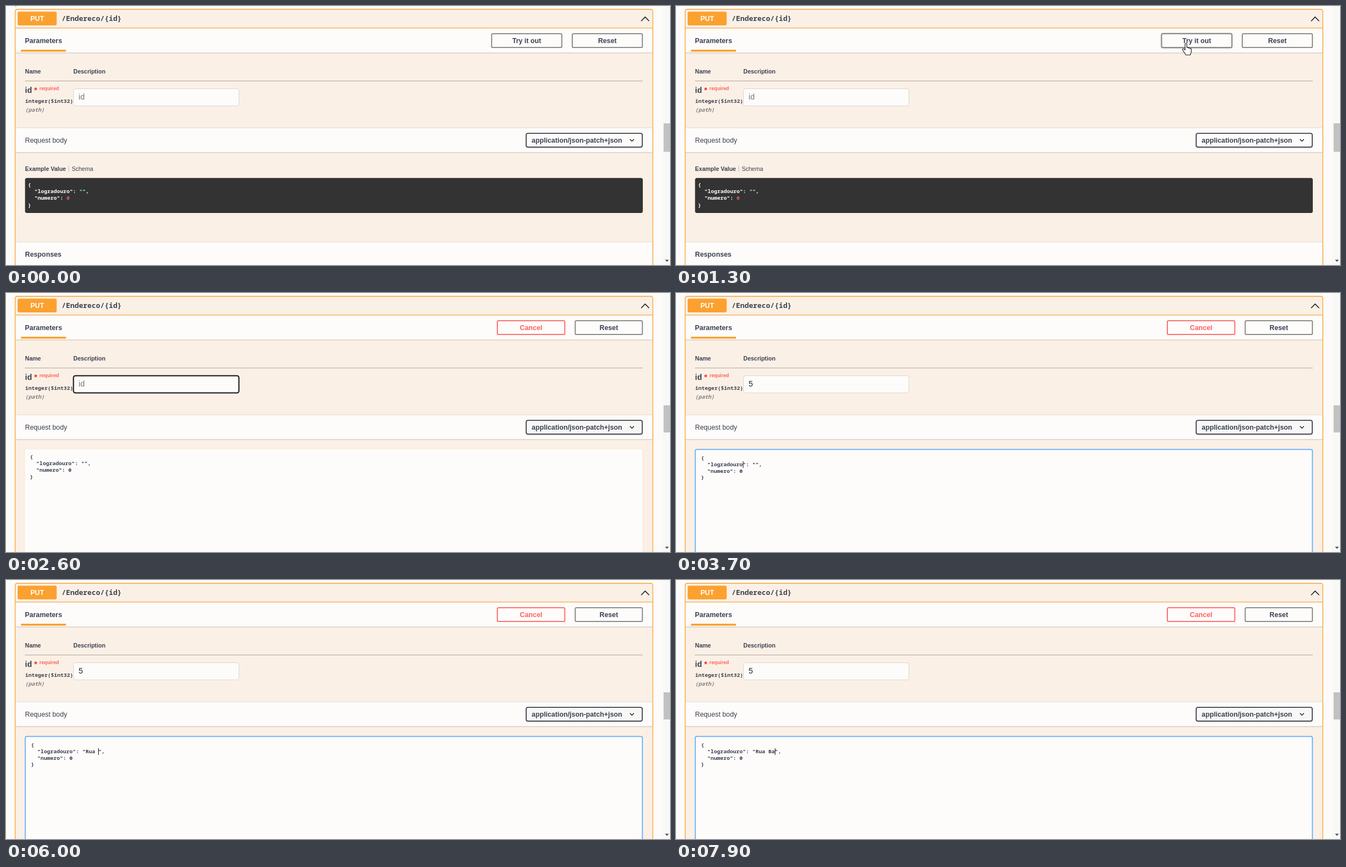
Write an HTML page that moves like this. It is 1196 by 468 pixels and loops after 8 s.

```html
<!DOCTYPE html>
<html lang="en">
<head>
<meta charset="utf-8">
<title>API request form</title>
<style>
html, body { margin: 0; width: 100%; height: 100%; overflow: hidden; background: #fcfbfa; }
svg { display: block; width: 1196px; height: 468px; }
text { font: 12.3px "Liberation Sans", Arial, sans-serif; fill: #3b4151; white-space: pre; }
.b { font-weight: 700; }
.s { font-size: 10.52px; }
.field { font-size: 14.03px; }
.mid { text-anchor: middle; }
.mono { font: 700 9.65px "Noto Sans Mono", "DejaVu Sans Mono", monospace; }
.edit { font-weight: 600; }
.code { fill: #fff; }
.btn { fill: #fdfcfb; stroke: #808080; stroke-width: 1.75; }
</style>
</head>
<body>
<svg viewBox="0 0 1196 468" xmlns="http://www.w3.org/2000/svg">
  <defs>
    <filter id="soft" x="-10%" y="-30%" width="120%" height="160%"><feGaussianBlur stdDeviation="1.8"/></filter>
    <filter id="thin" x="-5%" y="-100%" width="110%" height="300%"><feGaussianBlur stdDeviation="0.8"/></filter>
  </defs>
  <rect width="1196" height="468" fill="#fcfbfa"/>
  <rect x="1183" width="13" height="468" fill="#f8f8f7"/>
  <rect id="thumb" x="1184.5" width="11.5" fill="#c1c1c1"/>
  <path d="M1187 458.5h7l-3.5 3.7z" fill="#505050"/>

  <rect x="16.5" y="6" width="1148.5" height="480" rx="3.5" fill="#fbf0e5"/>
  <g id="bands"></g>
  <path d="M17 40H1165" stroke="#fca130"/>
  <rect x="16.5" y="6" width="1148.5" height="480" rx="3.5" fill="none" stroke="#fca130" stroke-width="1.3"/>

  <rect x="21" y="10.3" width="70.3" height="24.7" rx="2.7" fill="#fca130"/>
  <text class="b mid" x="56.2" y="27" style="fill:#fff">PUT</text>
  <text class="mono" x="100.3" y="27.2" style="font-size:12.87px">/Endereco/{id}</text>
  <path d="M1144 27.3l7.2-7.4 7.2 7.4" fill="none" stroke="#222" stroke-width="1.6"/>

  <text class="b" x="34" y="66.7">Parameters</text>
  <rect x="27" y="79" width="81" height="3.5" fill="#fca130"/>
  <rect id="glow" y="49.5" height="26.5" rx="3.5" fill="#000" filter="url(#soft)"/>
  <rect id="actBox" class="btn" y="50.2" height="24.7" rx="2"/>
  <text id="actText" class="b mid" y="66.7"></text>
  <rect id="resetBox" class="btn" y="50.2" height="24.7" rx="2"/>
  <text id="resetText" class="b mid" y="66.7">Reset</text>

  <text class="b s" x="34.3" y="122">Name</text>
  <text class="b s" x="121.3" y="122">Description</text>
  <path d="M34 135.5H1147" stroke="#aea69f"/>
  <text class="b field" x="34.3" y="157">id</text>
  <text class="b field" x="50.7" y="157" style="fill:#f22">*</text>
  <text class="b" x="60.3" y="152.3" style="font-size:8.77px;fill:#fd625c">required</text>
  <text class="mono" x="34.5" y="174.6">integer($int32)</text>
  <text class="mono" x="34.5" y="191.3" style="fill:#808080;font-style:italic">(path)</text>
  <rect id="idBox" x="121.5" y="149.5" width="298" height="31" rx="3.5" fill="#fdfcfb"/>
  <text id="idText" class="field" x="130.8" y="169.3"></text>

  <text x="34.3" y="247">Request body</text>
  <rect x="936.5" y="231" width="210" height="25.5" rx="3.5" fill="#000" opacity=".25" filter="url(#thin)"/>
  <rect id="typeBox" x="937" y="230.2" width="209" height="24.6" rx="3" stroke="#41444e" stroke-width="1.75"/>
  <text class="b" x="946.8" y="247">application/json-patch+json</text>
  <path d="M1123.8 240.8l3.6 3.5 3.6-3.5" fill="none" stroke="#222" stroke-width="1.5"/>

  <g id="example">
    <text class="b s" x="34.3" y="297.8">Example Value</text>
    <path d="M113 288.500V299.500" stroke="#c3bdb7"/>
    <text class="s" x="118.500" y="297.8">Schema</text>
    <rect x="34.3" y="310.700" width="1112.700" height="63.300" rx="3.500" fill="#333"/>
    <text class="mono code" x="39.6" y="325.7">{</text>
    <text class="mono code" x="51.2" y="338">"logradouro": <tspan fill="#a2fca2">""</tspan>,</text>
    <text class="mono code" x="51.2" y="350.2">"numero": <tspan fill="#d36363">0</tspan></text>
    <text class="mono code" x="39.6" y="362.500">}</text>
    <text class="b" x="34.3" y="453">Responses</text>
  </g>

  <g id="editor">
    <rect id="area" x="34.700" y="282.700" width="1111.600" height="250" rx="3" fill="#fdfcfb"/>
    <g id="body">
      <text class="mono edit" x="43" y="299.300">{</text>
      <text id="street" class="mono edit" x="54.6" y="311.200"></text>
      <text class="mono edit" x="54.6" y="323">"numero": 0</text>
      <text class="mono edit" x="43" y="334.800">}</text>
    </g>
  </g>
  <rect id="caret" width="1" fill="#111"/>

  <path id="arrow" d="M0 0V16.200L3.700 12.700 6.200 18.600 8.700 17.500 6.300 11.700H11.400Z" fill="#fff" stroke="#222"/>
  <path id="hand" d="M-1.500 1.200C-1.500-.9 1.700-.9 1.700 1.200V7C3-.1 4.800 7 4.800 8.200 6 7 7.300 7.700 7.400 9 8.400 8.200 9.600 8.800 9.600 10.200V13.500C9.600 16.500 8 17.500 7.700 20.200H-.4C-1-17.500-.500 17.500-5.600 11.300-6.700 9.500-4.700 8.100-3.200 9.600L-1.500 11.300Z" fill="#fff" stroke="#222" stroke-width="1.200" stroke-linejoin="round"/>
</svg>
<script>
const $ = id => document.getElementById(id);
const set = (id, attrs) => {
  for (const k in attrs) $(id).setAttribute(k, attrs[k]);
};
const show = (id, on) => { $(id).style.display = on ? "" : "none"; };
const within = (t, a, b) => t >= a && t < b;

const LOOP = 8000, CHAR = 5.79;
const WORD = "Rua Balune";
// [time, letters present]
const EDITS = [[0, 0], [4800, 1], [5500, 2], [5800, 3], [6000, 4], [6500, 5], [6600, 6],
  [6800, 8], [6900, 10], [7300, 9], [7400, 8], [7500, 7], [7700, 6]];

set("hand", { d: "M-1.6 11V1C-1.6-1.300 1.700-1.300 1.700 1V6.800C2.700 5.700 4.500 6 4.700 7.600 5.700 6.700 7.200 7.100 7.400 8.600 8.400 7.900 9.700 8.500 9.700 9.900V13.500C9.700 16.500 8 17.300 7.800 20H-.3C-.8 17.300-4 15-5.800 11.200-6.700 9.200-4.500 8-3.200 9.400Z" });

function addBand(top, bottom) {
  const rect = (y, h, fill, extra = "") =>
    `<rect x="17" y="${y}" width="1148" height="${h}" fill="${fill}" ${extra}/>`;
  return rect(top, bottom - top + 0.900, "#000", 'opacity=".2" filter="url(#thin)"') +
    rect(top, bottom - top, "#fdfcfa");
}

function place(id, x, y) {
  show(id, true);
  set(id, { transform: `translate(${x} ${y})` });
}

function drawPointer(t) {
  show("arrow", false);
  show("hand", false);
  if (t < 1200) {
    const p = Math.max(0, (t - 400) / 800);
    const e = p * p * (3 - 2 * p);
    place("arrow", 11 + 907 * e, -18.200 + 86 * e + 90 * e * (1 - e));
  } else if (t < 1800) {
    place("hand", 918.500, 68.500);
  } else if (t < 1900) {
    place("arrow", 735, 108);
  } else if (t < 2100) {
    place("arrow", 515.500, 158);
  } else if (within(t, 3000, 3400)) {
    const p = (t - 3000) / 300;
    place("arrow", 371 - 175 * p, 183 + 92 * p);
  }
}

function drawButtons(t, open) {
  const x = open ? 885 : 874.700, w = open ? 121.500 : 126.500;
  const rx = open ? 1025.300 : 1020;
  const red = t >= 1600;
  set("actBox", { x, width: w, style: `stroke:${red ? "#ff6060" : open ? "#8b7373" : "#808080"}` });
  set("glow", { x: x - 0.700, width: w + 1.400,
    opacity: within(t, 1200, 1800) ? (t < 1300 ? 0.2 : 0.4) : 0 });
  set("actText", { x: x + w / 2, style: red ? "fill:#ff6060" : "" });
  $("actText").textContent = open ? "Cancel" : "Try it out";
  set("resetBox", { x: rx, width: 1146.300 - rx });
  set("resetText", { x: (rx + 1146.300) / 2 });
}

function drawCaret(t, count) {
  let x, y = 304, h = 12, on = true;
  if (t < 3600) {
    x = t < 2800 ? 131 : 139;
    y = 157;
    h = 15;
    on = within(t, 2100, 2600) || within(t, 2800, 3300);
  } else if (t < 3800) {
    x = 120.500;
    if (t < 3700) y = 316;
  } else {
    x = Math.floor(143.400 + CHAR * count);
    if (count === 1) x = 148;
    on = !(within(t, 4300, 4800) || within(t, 5300, 5500) || within(t, 7500, 7900));
  }
  show("caret", on);
  set("caret", { x, y, height: h });
}

function draw(time) {
  const t = Math.floor(time / 100) * 100;
  const open = t >= 1500, editing = t >= 3600;
  const idFocus = within(t, 2100, 3600);
  const count = EDITS.filter(e => e[0] <= t).pop()[1];

  set("thumb", open ? { y: 203, height: 49 } : { y: 212, height: 51.500 });
  set("typeBox", { fill: open ? "#f7f7f6" : "#fdfcfb" });
  show("example", !open);
  show("lastBand", !open);
  show("editor", open);
  drawButtons(t, open);

  set("idBox", idFocus
    ? { stroke: "#111", "stroke-width": 2 }
    : { stroke: "#d9d7d5", "stroke-width": 1 });
  const typed = t >= 2800;
  $("idText").textContent = typed ? "5" : "id";
  $("idText").style.fill = typed ? "#222" : "#777";

  set("area", { stroke: editing ? "#61affe" : "none", "stroke-width": 1.750 });
  set("body", { transform: editing ? "translate(2 1.700)" : "" });
  $("street").textContent = `"logradouro": "${WORD.slice(0, count)}",`;
  drawCaret(t, count);
  drawPointer(t);
}

$("bands").innerHTML = addBand(40, 84) + addBand(220.500, 264) +
  `<g id="lastBand">${addBand(427, 475)}</g>`;

function tick(now) {
  draw(now % LOOP);
  requestAnimationFrame(tick);
}
draw(0);
requestAnimationFrame(tick);
</script>
</body>
</html>
```
